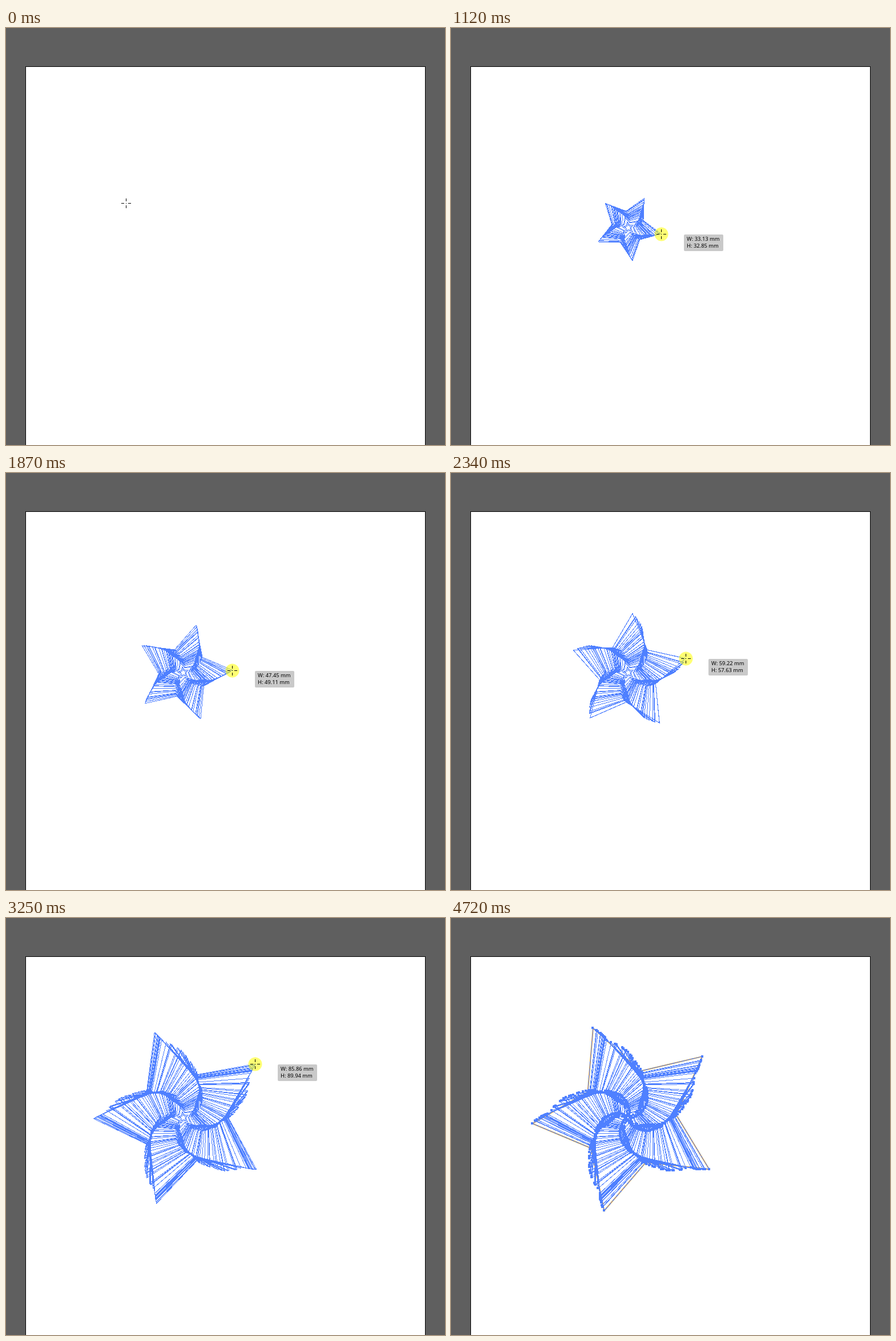
Animation, 769 px wide and 729 px high, one loop 5350 ms. Source, as an HTML page:

```html
<!DOCTYPE html>
<html lang="en">
<head>
<meta charset="utf-8">
<title>Star trail</title>
<style>
  html, body { margin: 0; width: 100%; height: 100%; overflow: hidden; background: #5f5f5f; }
  svg { display: block; width: 769px; height: 729px; }
  text { font: 9.4px "Noto Sans", "Open Sans", sans-serif; }
  .crisp { shape-rendering: crispEdges; }
  .line { fill: none; stroke: #4f80ff; }
  .guide { fill: none; stroke: #ff38ff; }
  .hint { fill: #f353ee; }
</style>
</head>
<body>
<svg viewBox="0 0 769 729">
  <rect width="769" height="729" fill="#5f5f5f"/>
  <rect class="crisp" x="34.5" y="67.5" width="700" height="700" fill="#fff" stroke="#000"/>
  <path id="glow" fill="none" stroke="#ffa514" stroke-width="2"/>
  <path id="stars" class="crisp line"/>
  <path id="anchors" class="crisp" fill="#4f80ff"/>
  <g id="guides">
    <path class="crisp guide" d="M308 352.5H384.5V562"/>
    <path class="guide" d="M382 559.5l5 5m0-5l-5 5M306 350l5 5m0-5l-5 5"/>
  </g>
  <circle id="press" r="12" fill="#ff0" fill-opacity=".55"/>
  <g id="label">
    <rect width="69" height="29" rx="2" fill="#c9c9c9"/>
    <text id="w" x="5" y="11"/>
    <text id="h" x="5" y="23"/>
  </g>
  <text id="hint" class="hint"/>
  <path id="cursor" class="crisp" fill="none" stroke="#000" d="M-8 .5h5M4 .5h5M.5-8v5M.5 4v5M0 .5h1"/>
</svg>
<script>
const LOOP = 5350, FRAME = 80, HOLD = 160;
const PRESS = 300, RELEASE = 3600, LEAVE = 3860, EXIT = 4640, GONE = 4720;
const CX = 310.5, CY = 349, MM = 3.322;

// The drag rests for HOLD ms at each pose: time, radius in mm, rotation in degrees.
const poses = [
  { t: PRESS - HOLD, r: 0, turn: 50 },
  { t: 560, r: 11.0996, turn: 18.907 },
  { t: 1400, r: 22.0935, turn: 2.3176 },
  { t: 2240, r: 31.2133, turn: -13.9102 },
  { t: 2800, r: 41.603, turn: -33.2143 },
  { t: 3340, r: 50.6, turn: -39.5 }
];
const last = poses[poses.length - 1];

const $ = id => document.getElementById(id);
const clamp = u => Math.min(1, Math.max(0, u));
const mix = (a, b, u) => a + (b - a) * u;
const glide = (t, from, to, [x0, y0], [x1, y1]) => {
  const u = clamp((t - from) / (to - from));
  return [mix(x0, x1, u), mix(y0, y1, u)];
};

function radiusAt(t) {
  const i = poses.findIndex(p => t < p.t);
  if (i < 0) return last.r;
  if (i === 0) return 0;
  const a = poses[i - 1], b = poses[i], from = a.t + HOLD;
  return mix(a.r, b.r, clamp((t - from) / (b.t - from)));
}

function turnAt(r) {
  const i = Math.max(1, poses.findIndex(p => r <= p.r));
  const a = poses[i - 1], b = poses[i];
  return mix(a.turn, b.turn, ((r - a.r) / (b.r - a.r)) ** 1.3);
}

function vertices(r) {
  const turn = turnAt(r);
  return Array.from({ length: 10 }, (_, i) => {
    const a = (turn - 36 * i) * Math.PI / 180, d = r * MM * (i % 2 ? .5 : 1);
    return [CX + d * Math.cos(a), CY + d * Math.sin(a)];
  });
}

const outline = pts => "M" + pts.map(p => p[0].toFixed(1) + " " + p[1].toFixed(1)).join("L") + "Z";
const square = ([x, y]) => `M${Math.floor(x) - 2} ${Math.floor(y) - 2}h4v4h-4z`;

function random(seed) {
  return () => (seed = seed * 16807 % 2147483647) / 2147483647;
}

// Stars come in clusters, more loosely near the centre.
const trail = [];
const rnd = random(4127);
for (let r = 2; r < last.r; r += .2 + 1.8 * rnd() ** 3 + Math.max(0, 1.2 - r / 7)) {
  const pts = vertices(r);
  trail.push({ r, pts, d: outline(pts) });
}
const finalPts = vertices(last.r);
const anchorPath = trail.flatMap(s => s.pts).concat(finalPts).map(square).join("");

const show = (id, on) => $(id).setAttribute("display", on ? "inline" : "none");
const place = (id, x, y) => $(id).setAttribute("transform", `translate(${x} ${y})`);

function size(pts, axis) {
  const v = pts.map(p => p[axis]);
  return ((Math.max(...v) - Math.min(...v)) / MM).toFixed(2);
}

function pointer(t, tip) {
  if (t < PRESS) return glide(t, FRAME, PRESS, [210, 306], [CX, CY]);
  if (t < RELEASE) return tip;
  return glide(t, LEAVE, EXIT, [440, 242], [676, 707]);
}

function draw(t) {
  const r = radiusAt(t), pts = vertices(r);
  const held = t >= PRESS && t < RELEASE, done = t >= RELEASE;
  const crossing = t >= 1400 && t < 1400 + HOLD, onAnchor = done && t < LEAVE;
  const [x, y] = pointer(t, pts[0]).map(Math.round);

  $("stars").setAttribute("d", r > 0
    ? trail.filter(s => s.r < r).map(s => s.d).join("") + outline(pts) : "");
  $("anchors").setAttribute("d", done ? anchorPath : "");
  $("glow").setAttribute("d", done ? outline(finalPts) : "");

  place("cursor", x, y);
  show("cursor", t < GONE);
  place("press", x + .5, y + .5);
  show("press", held);

  place("label", x + 40, y + 1);
  show("label", held);
  $("w").textContent = `W: ${size(pts, 0)} mm`;
  $("h").textContent = `H: ${size(pts, 1)} mm`;

  show("guides", crossing);
  show("hint", crossing || onAnchor);
  place("hint", x + 4, y - 4);
  $("hint").textContent = crossing ? "intersect" : "anchor";
}

const start = performance.now();
let shown = -1;
function tick() {
  const t = (performance.now() - start) % LOOP;
  const step = Math.floor(t / FRAME) * FRAME;
  if (step !== shown) draw(shown = step);
  requestAnimationFrame(tick);
}
tick();
</script>
</body>
</html>
```
